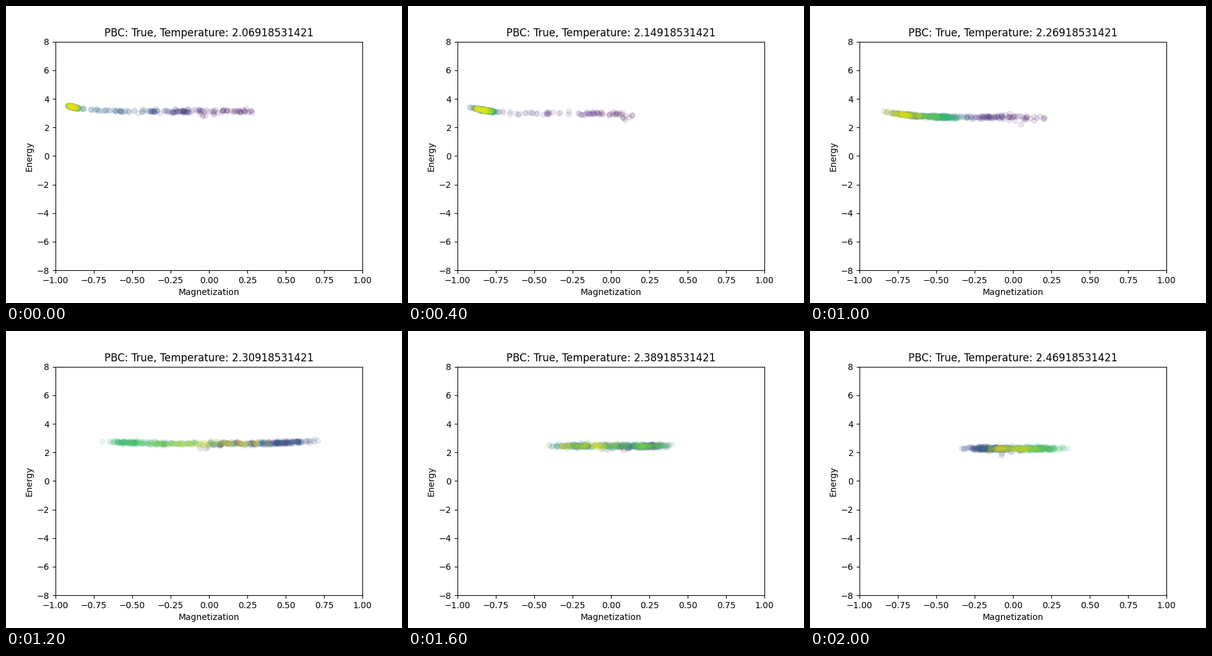
A matplotlib script for the animation above (2.1 s loop, 640x480 px).

```python
import numpy as np
import matplotlib.pyplot as plt
from matplotlib.animation import FuncAnimation

FRAMES = 21
STEPS = 500
CRITICAL = 10  # index of the critical temperature
T_C = 2 / np.log(1 + np.sqrt(2))
t = np.linspace(0, 1, STEPS)


def temperature(i):
    return T_C + 0.02 * (i - CRITICAL)


def spontaneous(temp):
    """Lattice magnetization, with a floor for the finite lattice size."""
    return max(0.06, 1 - np.sinh(2 / temp) ** -4) ** 0.125


def correlated(rng, memory):
    x = rng.normal(size=STEPS)
    for j in range(1, STEPS):
        x[j] = memory * x[j - 1] + np.sqrt(1 - memory ** 2) * x[j]
    return x


def ordered_path(i):
    """Fall into a well; slow runs first drift further the wrong way."""
    settle = 0.26 + 0.1 * np.cos(np.pi * i / 4)
    u = np.clip(t / settle, 0, 1)
    v = np.clip((t - settle) / (1 - settle), 0, 1)
    kick = (settle - 0.1) * np.sin(np.pi * np.clip(4 * u, 0, 1))
    dip = 0.3 * (i / CRITICAL) ** 3 * np.sin(np.pi * v) ** 4
    path = spontaneous(temperature(i)) * u ** 2 - kick - dip
    width = (0.016 + 0.0033 * i) * np.where(u < 1, 2.2, 1)
    return path, width


def disordered_path(i):
    """Swing around zero, less widely as it gets hotter."""
    size = 0.22 + 0.33 * np.exp(-(i - 12) / 2)
    turns = 1.4 - 0.3 * np.cos(np.pi * (i - 12) / 4)
    return size * np.sin(2 * np.pi * turns * t), 0.07


def simulate(i):
    rng = np.random.default_rng(40 + i)
    path, width = ordered_path(i) if i <= CRITICAL else disordered_path(i)
    side = 1 if i % 5 in (1, 2) else -1
    m = np.clip(side * path + width * correlated(rng, 0.7), -0.92, 0.9)

    # Energy: a flat floor that steepens towards full magnetization
    floor = 3.13 - 0.043 * i
    power = 8 - 0.333 * min(i, 12)
    well = (0.76 + 0.018 * i) * np.abs(m) ** power
    noise = 0.07 * (1 - 0.8 * m ** 2) * rng.normal(size=STEPS)
    start = 0.4 * np.exp(-np.arange(STEPS) / 4)
    return np.column_stack([m, floor + well + noise - start])


runs = [simulate(i) for i in range(FRAMES)]

fig, ax = plt.subplots(figsize=(6.4, 4.8), dpi=100)
dots = ax.scatter(*runs[0].T, c=t, cmap="viridis", alpha=0.1)
ax.set(xlim=(-1, 1), ylim=(-8, 8), xlabel="Magnetization", ylabel="Energy")
title = ax.set_title("")


def update(i):
    dots.set_offsets(runs[i])
    title.set_text(f"PBC: True, Temperature: {temperature(i):.11f}")
    return dots, title


anim = FuncAnimation(fig, update, frames=FRAMES, interval=100,
                     repeat=True, repeat_delay=0)
plt.show()
```
